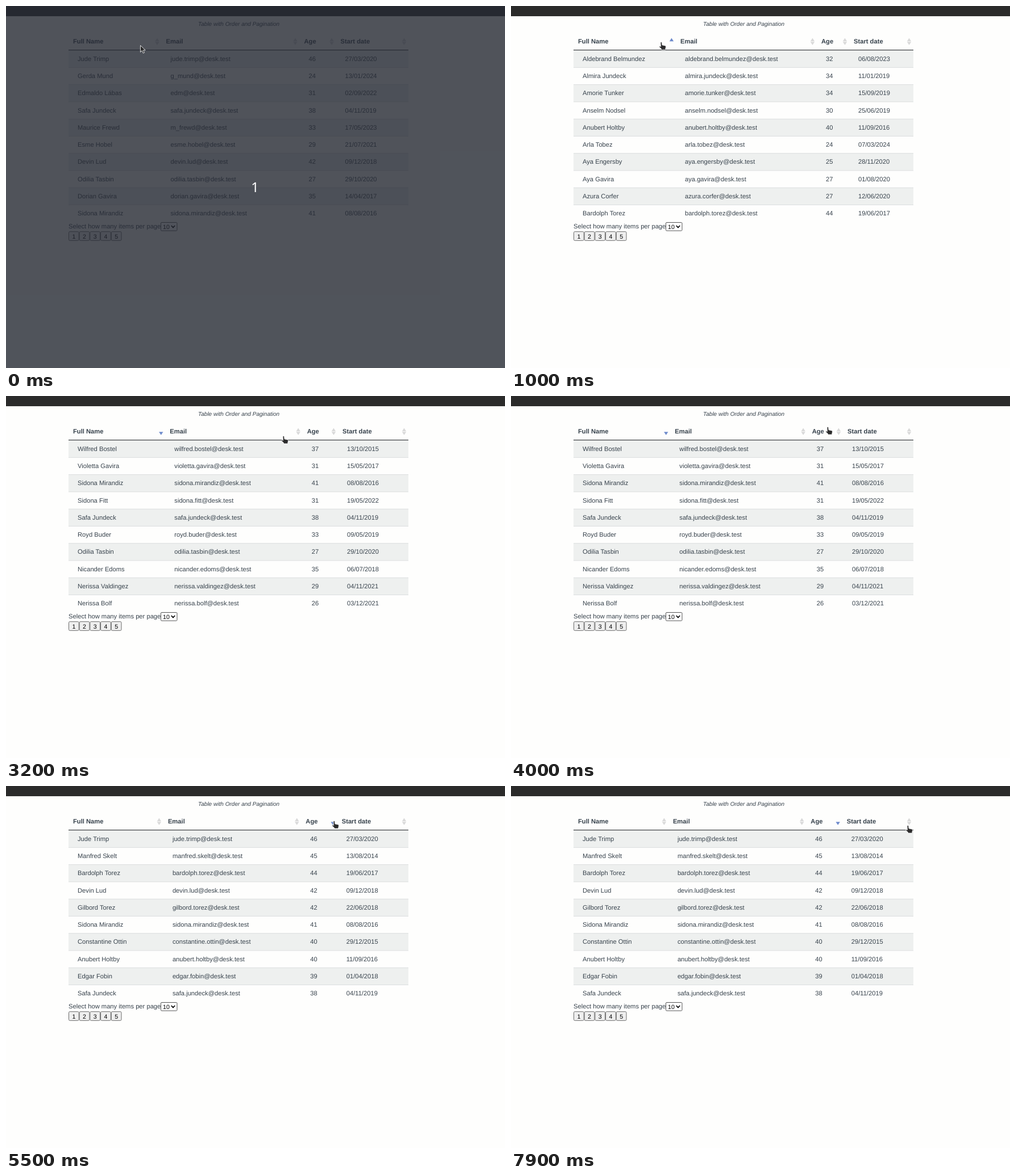
Write an HTML page that moves like this. It is 878x638 px and loops after 8000 ms.

```html
<!DOCTYPE html>
<html lang="en">
<head>
<meta charset="utf-8">
<title>Table with Order and Pagination</title>
<style>
  html, body { margin: 0; width: 100%; height: 100%; overflow: hidden; background: #fefefd; }
  svg { display: block; width: 878px; height: 638px; }
  text { font: 11.2px "Liberation Sans", Arial, sans-serif; fill: #38434d; text-rendering: geometricPrecision; }
  .head { font-weight: bold; }
  .caption { font-size: 10.05px; font-style: italic; }
  .control { font-size: 10.67px; fill: #000; }
  .count { font: 24px "Noto Sans", sans-serif; fill: #fff; }
  .sort { fill: #d9d9d9; }
  .active { fill: #6d8acb; }
  .cursor path { fill: #2b2b2b; stroke: #fff; stroke-width: .8; stroke-linejoin: round; }
</style>
</head>
<body>
<svg viewBox="0 0 878 638">
  <rect width="878" height="638" fill="#fefefd"/>
  <rect width="878" height="18" fill="#2b2b2b"/>
  <text class="caption" x="338" y="35">Table with Order and Pagination</text>
  <g id="table"></g>
  <text x="110" y="392">Select how many items per page</text>
  <g id="controls"></g>
  <g id="overlay">
    <rect width="878" height="638" fill="rgb(37,41,50)" fill-opacity=".8"/>
    <text class="count" x="438" y="328" text-anchor="middle">1</text>
  </g>
  <g id="cursor" class="cursor">
    <path id="arrow" d="M.5 .5V12.3L3.3 9.7L5.3 14.2L7.5 13.2L5.5 8.9H9.3Z"/>
    <path id="hand" d="M3 1.2Q4.3-.3 5.6 1.2L6 5.8L11.4 7Q12.8 7.5 12.6 9.2L11.9 12V14H4.5V12.6L.8 9.2Q.6 7.4 2.2 7.8L3.4 8.6Z"/>
  </g>
</svg>
<script>
const LOOP = 8000, LEFT = 110, RIGHT = 708, ROW = 30.28, TOP = 78;
const $ = id => document.getElementById(id);

// name, age, start date, optional mailbox
const people = `Jude Trimp,46,27/03/2020
Gerda Mund,24,13/01/2024,g_mund
Edmaldo Lábas,31,02/09/2022,edm
Safa Jundeck,38,04/11/2019
Maurice Frewd,33,17/05/2023,m_frewd
Esme Hobel,29,21/07/2021
Devin Lud,42,09/12/2018
Odilia Tasbin,27,29/10/2020
Dorian Gavira,35,14/04/2017
Sidona Mirandiz,41,08/08/2016
Aldebrand Belmundez,32,06/08/2023
Almira Jundeck,34,11/01/2019
Amorie Tunker,34,15/09/2019
Anselm Nodsel,30,25/06/2019
Constantine Ottin,40,29/12/2015
Anubert Holtby,40,11/09/2016
Arla Tobez,24,07/03/2024
Aya Engersby,25,28/11/2020
Aya Gavira,27,01/08/2020
Azura Corfer,27,12/06/2020
Bardolph Torez,44,19/06/2017
Wilfred Bostel,37,13/10/2015
Violetta Gavira,31,15/05/2017
Sidona Fitt,31,19/05/2022
Royd Buder,33,09/05/2019
Nicander Edoms,35,06/07/2018
Nerissa Valdingez,29,04/11/2021
Edith Pound,22,31/01/2023
Clothilde Dobbisen,23,10/02/2024
Livi Valdingez,25,13/12/2020
Mei Pind,26,02/01/2021
Nerissa Bolf,26,03/12/2021
Melinda Corfer,26,26/02/2021
Manfred Skelt,45,13/08/2014
Gilbord Torez,42,22/06/2018
Edgar Fobin,39,01/04/2018`.split('\n').map(line => {
  const [name, age, date, box = name.toLowerCase().replace(' ', '.')] = line.split(',');
  return [name, box + '@desk.test', age, date];
});

// start time, sorted column, direction, left edges of columns 2 to 4
const views = [
  { at: 0, col: -1, dir: 0, edges: [273.5, 516.5, 580.6] },
  { at: 1000, col: 0, dir: 1, edges: [290, 538, 595] },
  { at: 2200, col: 0, dir: -1, edges: [280.3, 521.7, 584] },
  { at: 4500, col: 2, dir: 1, edges: [284.5, 527.3, 587.8] },
  { at: 5400, col: 2, dir: -1, edges: [276.9, 519.3, 582.7] }
];

// time, x, y of the pointer
const path = [
  [0, 236, 69], [100, 241, 65], [400, 260, 66], [500, 260, 66], [600, 260, 63],
  [1400, 260, 63], [1600, 268, 64], [1700, 268, 64], [1800, 273, 64],
  [2600, 273, 64], [2900, 335, 72], [3200, 484, 70], [3500, 508, 60],
  [3800, 532, 47], [4200, 574, 61], [5400, 574, 61], [5500, 573, 61],
  [6900, 573, 61], [7100, 527, 44], [7500, 839, 82], [7800, 662, 70], [7900, 694, 69]
];

const text = (x, y, s, cls = '') => `<text class="${cls}" x="${x}" y="${y}">${s}</text>`;
const rect = (x, y, w, h, attrs) => `<rect x="${x}" y="${y}" width="${w}" height="${h}" ${attrs}/>`;

function sortIcon(x, dir) {
  const up = `M${x - 3.7} 62.2h7.4l-3.7-5.6z`, down = `M${x - 3.7} 63.2h7.4l-3.7 5.6z`;
  return `<path class="sort ${dir ? 'active' : ''}" d="${dir < 0 ? '' : up}${dir > 0 ? '' : down}"/>`;
}

function tableMarkup({ col, dir, edges }) {
  const lefts = [LEFT, ...edges], ends = [...edges, RIGHT];
  const rows = [...people];
  if (dir) rows.sort((a, b) => dir * a[col].localeCompare(b[col], 'en'));
  let out = '';
  rows.slice(0, 10).forEach((row, i) => {
    const y = TOP + i * ROW;
    if (i % 2 === 0) out += rect(LEFT, y, RIGHT - LEFT, ROW, 'fill="#eef0ef"');
    if (i) out += rect(LEFT, y - .4, RIGHT - LEFT, .9, 'fill="#d8dbdc"');
    row.forEach((cell, c) => out += text(lefts[c] + 16, y + 18.8, cell));
  });
  ['Full Name', 'Email', 'Age', 'Start date'].forEach((label, c) => {
    out += text(lefts[c] + 8, 66.2, label, 'head') + sortIcon(ends[c] - 7.5, c === col ? dir : 0);
  });
  return out + rect(LEFT, 77, RIGHT - LEFT, 1.2, 'fill="#3a3d40"');
}

function controlsMarkup() {
  let out = rect(272.5, 381.5, 28.5, 14.6, 'rx="1.5" fill="#fff" stroke="#555"')
    + text(276, 392.6, '10', 'control')
    + '<path d="M290.8 387l3.2 3.4l3.2-3.4" fill="none" stroke="#000" stroke-width="1.7"/>';
  for (let i = 0; i < 5; i++) {
    const x = 110 + i * 18.7;
    out += rect(x + .5, 397.7, 17.7, 15.6, 'rx="1.8" fill="#efefef" stroke="#6a6a6a"')
      + text(x + 6.4, 409.5, i + 1, 'control');
  }
  return out;
}

function pointerAt(t) {
  const i = path.findIndex(p => p[0] > t);
  if (i < 0) return path[path.length - 1].slice(1);
  const [a, b] = [path[i - 1], path[i]], k = (t - a[0]) / (b[0] - a[0]);
  return [1, 2].map(n => a[n] + (b[n] - a[n]) * k);
}

const tables = views.map(tableMarkup);
let shown = -1;
$('controls').innerHTML = controlsMarkup();

function draw(now) {
  const t = Math.floor(now % LOOP / 100) * 100;
  const view = views.filter(v => v.at <= t).length - 1;
  if (view !== shown) $('table').innerHTML = tables[shown = view];
  const [x, y] = pointerAt(t);
  const counting = t < 100;
  const onHeader = !counting && x < RIGHT && y > 45 && y < 77;
  $('overlay').style.display = counting ? '' : 'none';
  $('hand').style.display = onHeader ? '' : 'none';
  $('arrow').style.display = onHeader ? 'none' : '';
  $('cursor').setAttribute('transform', `translate(${Math.round(x)} ${Math.round(y)})`);
}

const start = performance.now();
function tick() {
  draw(performance.now() - start);
  requestAnimationFrame(tick);
}
tick();
</script>
</body>
</html>
```
